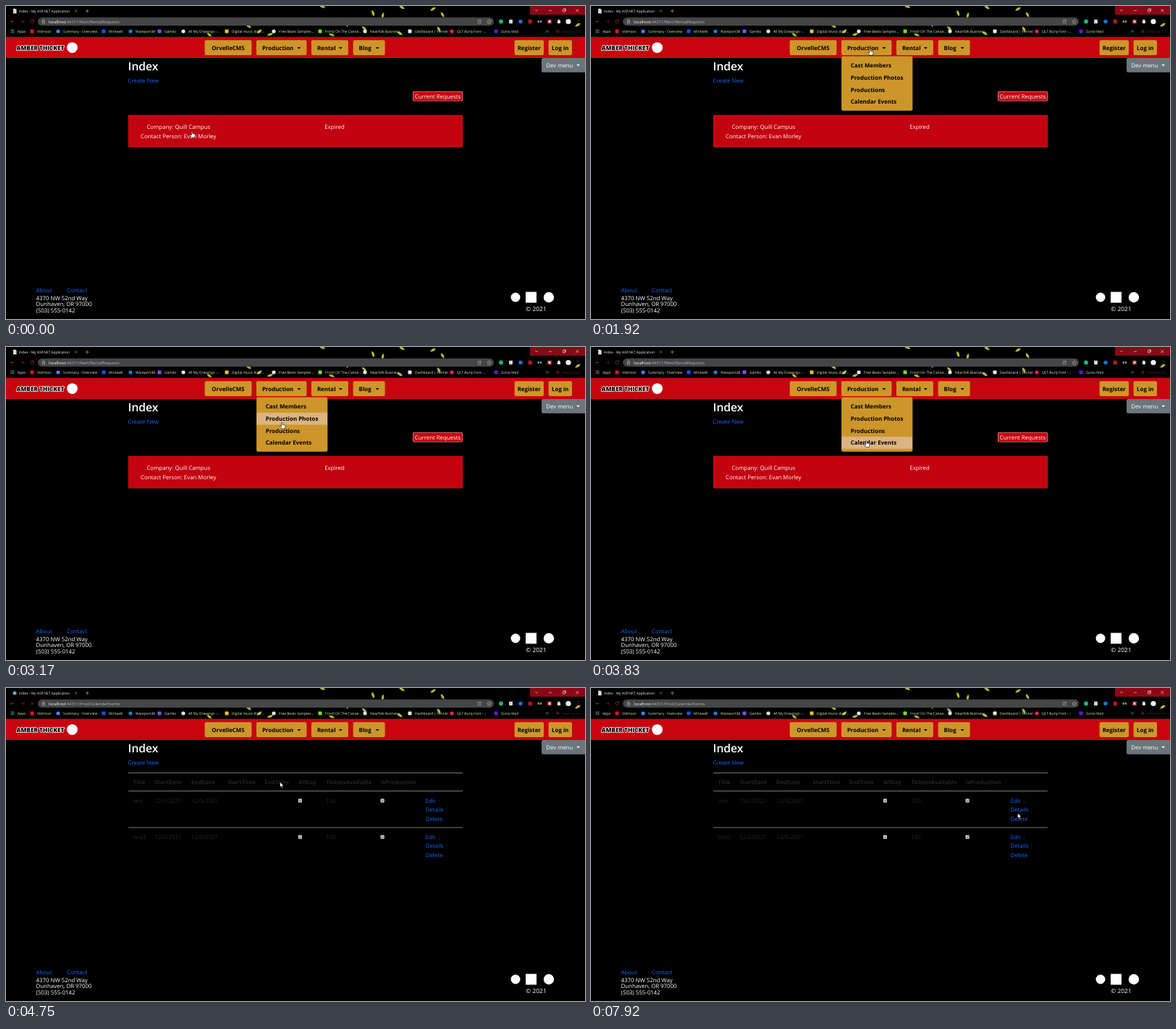
Recreate the animation shown at these times as an HTML page. Size 800 px wide and 433 px high, loop 8 s.

```html
<!DOCTYPE html>
<html lang="en">
<head>
<meta charset="utf-8">
<title>Index - My ASP.NET Application</title>
<style>
  html, body { margin: 0; width: 100%; height: 100%; overflow: hidden; background: #000; }
  svg { display: block; width: 100%; height: 100%; }
  text {
    font-family: "Open Sans", "Noto Sans", sans-serif;
    font-size: 7.84px; fill: #fff; white-space: pre;
    text-rendering: geometricPrecision;
  }
  .b { font-weight: 700; font-size: 7.9px; fill: #000; }
  .th { font-weight: 700; font-size: 7.78px; fill: #212529; }
  .td { fill: #212529; }
  .a { fill: #1468ff; }
  .mid { text-anchor: middle; }
  .ui { font-size: 4.9px; fill: #f0f0f0; }
  .mark { font-size: 4.9px; fill: #f1edb4; }
  .url { font-size: 5.63px; fill: #b4b6b9; }
</style>
</head>
<body>
<svg id="stage" viewBox="0 0 800 433" preserveAspectRatio="none"></svg>
<script>
const NS = "http://www.w3.org/2000/svg";
const stage = document.getElementById("stage");
const RED = "#c8040f", GOLD = "#cd962a", NAV_ICON = "#a8323a";

function add(tag, attrs, parent = stage) {
  const el = document.createElementNS(NS, tag);
  for (const k in attrs) el.setAttribute(k, attrs[k]);
  return parent.appendChild(el);
}
const group = (parent = stage) => add("g", {}, parent);
const rect = (x, y, width, height, fill, rx = 0, p = stage) =>
  add("rect", { x, y, width, height, fill, rx }, p);
const dot = (cx, cy, r, fill, p = stage) => add("circle", { cx, cy, r, fill }, p);
const line = (d, stroke = "#ddd", w = 0.8, p = stage) =>
  add("path", { d, stroke, "stroke-width": w, fill: "none" }, p);
const shape = (d, fill, p = stage) => add("path", { d, fill }, p);
function text(x, y, str, cls = "", p = stage) {
  const el = add("text", { x, y, class: cls }, p);
  el.textContent = str;
  return el;
}
const caret = (x, y, fill) => shape(`M${x - 2.5} ${y - 1.2}h5l-2.5 2.5z`, fill);
const show = (el, on) => el.setAttribute("display", on ? "inline" : "none");

// ---- browser chrome ----
rect(0, 0, 800, 433, "#000");
rect(724, 0, 76, 12, "#8c0716");
line("M731.2 5.2l1.8 1.8l1.8 -1.8M750 6.3h4M769.4 5h3v3h-3zM770.6 4.9v-1.1h3v3h-1M787.4 4.2l4 4M791.4 4.2l-4 4", "#eee", 0.6);

const leaves = [
  [437, 1, 20], [507, 10, 70], [520.5, 13, 100], [547, 2, 30], [590, 4, 150], [603, 12, 60],
  [281, 40, 40], [335, 28, 30], [350, 35, 140], [365, 39, 160], [450, 40, 20],
  [471, 25, 80], [495, 31, 45], [598, 32, 60], [544, 38, 30], [790, 26, 150]
];
for (const [x, y, a] of leaves)
  add("path", { d: "M-4.4 0Q0 -3.8 4.4 0Q0 3 -4.4 0z", fill: "#b5b82e", transform: `translate(${x} ${y}) rotate(${a})` });

const favicon = group();
shape("M10 3.8h3l1.5 1.5v5h-4.5z", "#e9e9e9", favicon);
line("M10.8 6.3h2.8M10.8 8h2.8", "#888", 0.4, favicon);
const loader = group();
dot(12, 7, 2.6, "#6f9fd8", loader);
text(18, 8.8, "Index - My ASP.NET Application", "ui");
line("M95 5.3l3.2 3.2M98.2 5.3l-3.2 3.2", "#20c5b5", 0.7);
line("M109.8 7h5M112.3 4.5v5", "#d3a52b", 0.7);

line("M11.5 21.5h-5M8.6 19.3l-2.2 2.2l2.2 2.2", NAV_ICON, 0.7);
line("M20.5 21.5h5M23.3 19.3l2.2 2.2l-2.2 2.2", "#6d2227", 0.7);
const reload = line("M38 20a2.3 2.3 0 1 0 .3 2M38.4 18.6v1.9h-1.9", NAV_ICON, 0.7);
const stop = line("M34.2 19.4l4 4M38.2 19.4l-4 4", NAV_ICON, 0.7);
rect(44, 15.8, 630, 11.4, "#444547", 5.7);
line("M50 21.2h3.6v2.6h-3.6zM50.7 21v-1a1.1 1.1 0 0 1 2.2 0v1", "#ccc", 0.6);
const url = text(59, 23.5, "", "url");
const host = add("tspan", { fill: "#fff" }, url);
host.textContent = "localhost";
const path = add("tspan", {}, url);
line("M655 19.6h-2.8v4.2h4v-1.6M654 22q0 -2 2.6 -2M655.5 18.8l1.4 1.2l-1.4 1.2", "#ccc", 0.5);
line("M667.6 18.7l.9 1.9l2 .2l-1.5 1.4l.4 2l-1.8 -1l-1.8 1l.4 -2l-1.5 -1.4l2 -.2z", "#ccc", 0.5);

dot(684, 21.5, 2.9, "#15b77e");
rect(695, 18.8, 5, 5.4, "#d5d5d5", 1);
dot(711, 21.5, 2.8, "#1570d8");
rect(721.5, 18.8, 5.4, 5.4, "#b01822", 1);
rect(734.5, 20, 2.4, 3, "#8a8a8a");
rect(737.8, 20, 2.4, 3, "#8a8a8a");
rect(748.3, 18.8, 5.4, 5.4, "#d6413b", 0.5);
rect(749.8, 20.3, 2.4, 2.4, "#fff");
rect(761.8, 19.8, 4.2, 4.2, "#ddd", 0.6);
dot(763.9, 19.5, 1.1, "#ddd");
dot(777, 21.5, 3.6, "#f2f2f2");
for (const y of [19.4, 21.5, 23.6]) dot(790.5, y, 0.55, NAV_ICON);

// ---- bookmarks ----
for (let i = 0; i < 9; i++)
  rect(6.4 + (i % 3) * 1.8, 32.4 + Math.floor(i / 3) * 1.8, 1.2, 1.2, ["#e2463a", "#4db35a", "#4d8df0"][i % 3]);
text(16, 36.8, "Apps", "mark");
const marks = [
  [43, "Vidmoor", "#f00d1a"], [79, "Summary - Overview", "#4484ec"], [142, "Mintwell", "#1652f0"],
  [179, "Wareport38", "#1d7fd0"], [219, "Gamlio", "#9146ff"], [252, "All My Drawings -...", "#e6e6e6"],
  [312, "Digital music distr...", "#e7c522"], [377, "Free Beats Samples...", "#ececec"],
  [441, "Frost! On The Canoe...", "#73e01c"], [503, "Nearfolk Business...", "#dce4f2"],
  [565, "Dashboard | Fennel", "#f0ecd8"], [623, "QLT Burly Font -...", "#ee2255"], [684, "Zunio Mail", "#6a12d6"]
];
marks.forEach(([x, label, color], i) => {
  if (i % 2) dot(x - 7, 35, 2.6, color);
  else rect(x - 9.5, 32.5, 5, 5, color, 0.8);
  text(x, 36.8, label, "mark");
});
line("M746 33.4l1.5 1.6l-1.5 1.6M748.2 33.4l1.5 1.6l-1.5 1.6", "#ddd", 0.5);
rect(760, 32.8, 4.4, 4.4, "#421015", 0.5);
text(768, 36.8, "Reading list", "mark").style.fill = "#5a151b";
rect(0, 41.8, 800, 0.9, "#3a1114");

// ---- page A: rental requests ----
const rental = group();
rect(562, 118, 69, 13.5, "#f0b5b8", 2, rental);
rect(562.6, 118.6, 67.8, 12.3, RED, 1.6, rental);
text(596.5, 128, "Current Requests", "mid", rental);
rect(168.8, 150.8, 462.4, 44.6, "#d41420", 1.6, rental);
rect(169.4, 151.4, 461.2, 43.4, "#c3030f", 1.2, rental);
text(238.3, 170.3, "Company: Quill Campus", "mid", rental);
text(238.3, 182.9, "Contact Person: Evan Morley", "mid", rental);
text(454, 170.3, "Expired", "mid", rental);

// ---- page B: calendar events ----
const calendar = group();
for (const y of [117, 142.2, 192.6]) rect(169, y, 462, 0.8, "#94979a", 0, calendar);
const columns = [[175.5, "Title"], [205.3, "StartDate"], [256, "EndDate"], [306.5, "StartTime"],
  [357.3, "EndTime"], [404, "AllDay"], [442.2, "TicketsAvailable"], [517.4, "IsProduction"]];
for (const [x, label] of columns) text(x, 133.2, label, "th", calendar);
function row(y, name, start) {
  const cells = [[175.5, name], [205.3, start], [256, "12/9/2021"], [442.2, "100"]];
  for (const [x, s] of cells) text(x, y, s, "td", calendar);
  for (const x of [403.8, 517.5]) {
    rect(x, y - 5.4, 5.2, 5.2, "#c9c9c9", 0.8, calendar);
    line(`M${x + 1.2} ${y - 2.7}l1.2 1.2l1.8 -2.4`, "#444", 0.8, calendar);
  }
  ["Edit", "Details", "Delete"].forEach((s, i) => text(579.7, y + i * 12.5, s, "a", calendar));
  text(596, y, "|", "td", calendar);
  text(606.8, y + 12.5, "|", "td", calendar);
}
row(158.6, "test", "12/1/2021");
row(208.9, "test2", "12/2/2021");

// ---- shared page parts ----
const title = text(168.6, 88.7, "Index");
title.style.cssText = "font-weight:600;font-size:15.7px";
text(168.6, 105.8, "Create New", "a");

rect(0, 43, 800, 29, RED);
const brand = text(14.5, 61.2, "AMBER THICKET");
brand.style.cssText = "font-weight:800;font-size:8.2px;fill:#000;stroke:#fff;stroke-width:1.6px;paint-order:stroke;stroke-linejoin:round";
dot(91.5, 57.6, 7.4, "#fff");

function button(x, w, label, menu) {
  rect(x, 47.2, w, 20.8, GOLD, 2);
  if (menu) {
    text(x + 8, 60.8, label, "b");
    caret(x + w - 10.5, 58.2, "#000");
  } else text(x + w / 2, 60.8, label, "b mid");
}
button(274.6, 64.8, "OrvelleCMS");
button(345.9, 69.5, "Production", true);
button(421.9, 51, "Rental", true);
button(479.6, 44, "Blog", true);
button(702.6, 40.4, "Register");
button(749.6, 32.4, "Log in");

rect(740, 72, 62, 19.8, "#6c757d", 2);
text(746.3, 85.2, "Dev menu");
caret(790.6, 82, "#fff");

text(41.6, 396, "About", "a");
text(84, 396, "Contact", "a");
["4370 NW 52nd Way", "Dunhaven, OR 97000", "(503) 555-0142"].forEach((s, i) => text(41.6, 407.1 + i * 8.35, s));
dot(704, 403, 6.5, "#fff");
rect(718, 395.5, 15, 15, "#fff");
dot(750, 403, 7.2, "#fff");
text(732.5, 421.8, "© 2021", "mid").style.fontSize = "8.4px";

// ---- dropdown ----
const menu = group();
rect(346, 69.4, 98.4, 75.4, "#a9781f", 2, menu);
rect(346.4, 69.8, 97.6, 74.6, GOLD, 1.8, menu);
const hover = rect(346.4, 0, 97.6, 16.7, "#dcb482", 0, menu);
["Cast Members", "Production Photos", "Productions", "Calendar Events"]
  .forEach((s, i) => text(358.7, 85.4 + i * 16.65, s, "b", menu));

// ---- pointers, hot spot at 0,0 ----
const pointer = group();
const ink = { fill: "#fff", stroke: "#000", "stroke-width": 0.6, "stroke-linejoin": "round" };
const hand = add("path", { ...ink, d: "M-.8 .6Q0 -.7 .8 .6V3.4L2.4 3.7L3.9 4.3Q4.6 4.6 4.5 5.6L3.8 9H-.6L-3 5.9Q-3.3 4.8 -2.2 4.9L-.8 6z" }, pointer);
const arrow = add("path", { ...ink, d: "M0 0V7.3L1.7 5.8L2.8 8.4L4.1 7.9L3 5.3H5.2z" }, pointer);

// ---- timeline ----
const LOOP = 8000, STEP = 1000 / 12;
const track = [
  [0, 257, 173], [583, 257, 173], [1000, 318, 118], [1417, 393, 62], [1750, 385.5, 59],
  [2417, 385.5, 59], [2750, 384, 80], [3167, 381.5, 104], [3250, 381.5, 105], [3667, 380.5, 129.5],
  [4083, 380.5, 129.5], [4333, 378.5, 130], [6917, 378.5, 130], [7333, 478, 158],
  [7750, 569, 180], [7917, 589.5, 173], [LOOP, 589.5, 173]
];
const MENU_OPEN = 1910, CLICK = 4070, LOADED = 4490, SETTLED = 4820;

function place(t) {
  const i = Math.max(1, track.findIndex(k => k[0] >= t));
  const [t0, x0, y0] = track[i - 1], [t1, x1, y1] = track[i];
  const u = (t - t0) / (t1 - t0);
  return [x0 + (x1 - x0) * u, y0 + (y1 - y0) * u];
}

function draw(now) {
  const t = Math.floor((now % LOOP + 4) / STEP) * STEP % LOOP;
  const [x, y] = place(t);
  const open = t >= MENU_OPEN && t < CLICK;
  const loaded = t >= LOADED, busy = t >= CLICK && t < SETTLED;
  const item = Math.floor((y - 74.2) / 16.65);

  pointer.setAttribute("transform", `translate(${x.toFixed(2)} ${y.toFixed(2)})`);
  const link = t < 670 || (t > 1300 && t < CLICK);
  show(hand, link);
  show(arrow, !link);
  show(menu, open);
  show(hover, item >= 0 && item < 4);
  hover.setAttribute("y", 74.2 + item * 16.65);
  show(rental, !loaded);
  show(calendar, loaded);
  show(reload, !busy);
  show(stop, busy);
  show(favicon, !busy);
  show(loader, busy);
  path.textContent = ":44311/" + (loaded ? "Prod/CalendarEvents" : "Rent/RentalRequests");
}

const start = performance.now();
function tick() {
  draw(performance.now() - start);
  requestAnimationFrame(tick);
}
tick();
</script>
</body>
</html>
```
